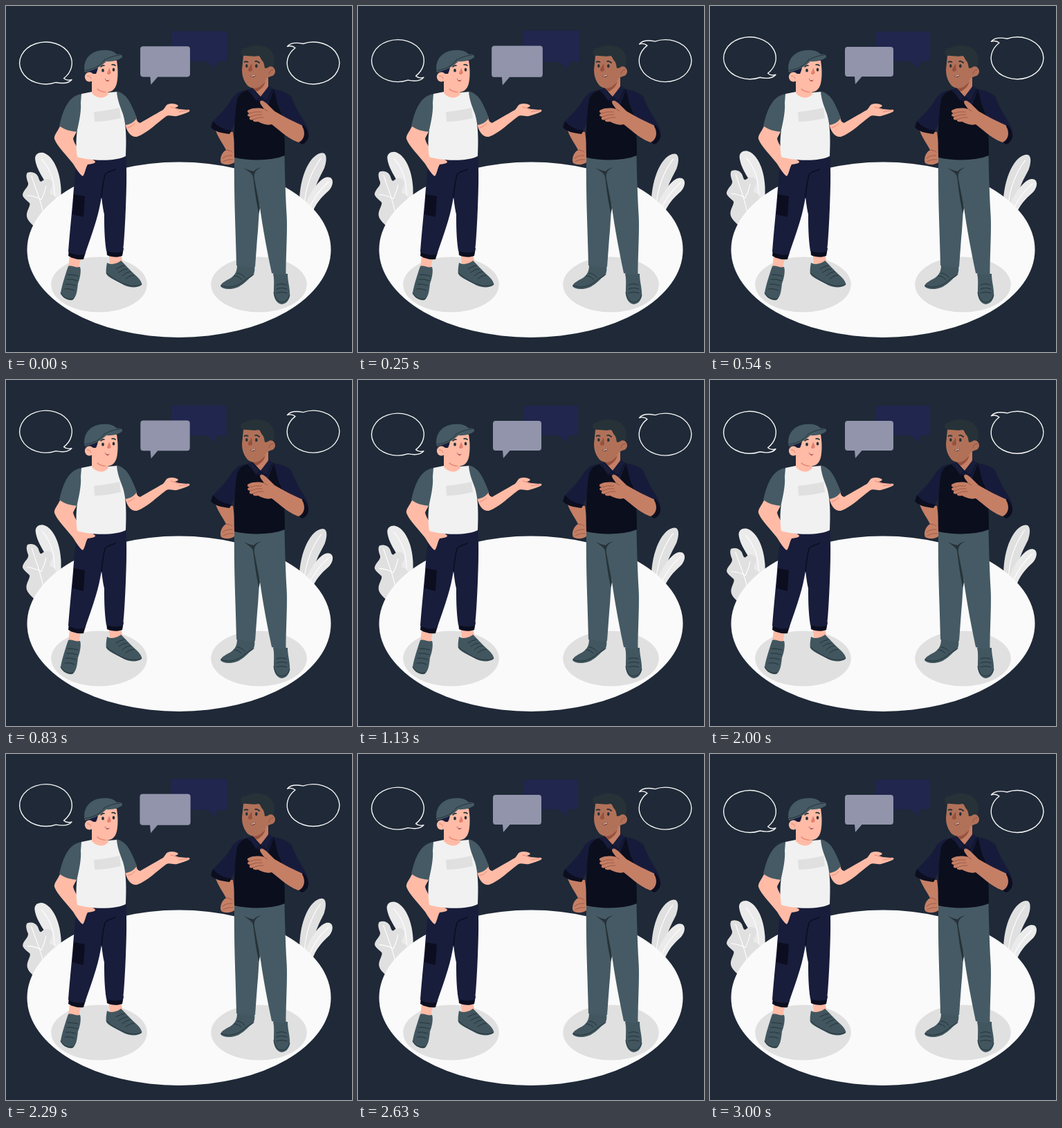
An HTML page with a canvas that plays this animation: 500 by 500 pixels, repeating every 3040 ms.

```html
<!DOCTYPE html>
<html lang="en">
<head>
<meta charset="utf-8">
<title>Two people talking</title>
<style>
  html, body { margin: 0; width: 100%; height: 100%; overflow: hidden; background: #1f2937; }
  canvas { display: block; width: 100vw; height: 100vh; }
</style>
</head>
<body>
<canvas id="stage"></canvas>
<script>
const canvas = document.getElementById('stage');
const ctx = canvas.getContext('2d');
const LOOP = 3040;
const C = {
  bg: '#1f2937', floor: '#fafafa', shade: '#e0e0e0', leaf: '#ebebeb',
  slate: '#455a64', ink: '#263238', shoe: '#41565f', navy: '#181d3b', deep: '#0c0e20',
  skin: '#ffbba6', blush: '#e5806e', brown: '#c57f65', face: '#b17159', umber: '#96523f',
  shirt: '#f1f1f1', vest: '#0b0e1d', sleeve: '#171b3b',
  bubble: '#9194aa', bubbleBack: '#20264d'
};

function fill(d, color) {
  ctx.fillStyle = color;
  ctx.fill(new Path2D(d));
}

function line(d, color, width = 1) {
  ctx.strokeStyle = color;
  ctx.lineWidth = width;
  ctx.lineCap = ctx.lineJoin = 'round';
  ctx.stroke(new Path2D(d));
}

function oval(x, y, rx, ry, color) {
  ctx.beginPath();
  ctx.ellipse(x, y, rx, ry, 0, 0, Math.PI * 2);
  ctx.fillStyle = color;
  ctx.fill();
}

// Draws with a rotation and scale about a pivot.
function about(x, y, angle, scale, draw) {
  ctx.save();
  ctx.translate(x, y);
  ctx.rotate(angle);
  ctx.scale(scale, scale);
  ctx.translate(-x, -y);
  draw();
  ctx.restore();
}

// Linear interpolation through [position, value] keys.
function keys(p, list) {
  for (let i = 1; i < list.length; i++) {
    const [a, u] = list[i - 1], [b, v] = list[i];
    if (p <= b) return u + (v - u) * (p - a) / (b - a);
  }
  return list[list.length - 1][1];
}

const floating = [[0, 0], [.5, -10], [1, 0]];
const beat = [[0, 1], [.1, 1.1], [.3, 1], [.4, 1], [.5, 1.1], [.6, 1], [1, 1]];
const wind = [[0, 0], [.25, 1], [.75, -1], [1, 0]];

function plants() {
  fill('M42 221C42 215 46 212 52 212C66 214 78 236 79.5 264L80 295L58 300C63 275 60 262 54 250C48 240 43 231 42 221Z', C.leaf);
  line('M52 222C64 236 72 254 70 285', '#fff', 1.1);
  fill('M31 241C37 239 43 241 46 246C48 250 48 254 51 254C57 248 66 249 67 256C68 263 61 268 64 272C68 273 71 274 72 279L56 312L41 319C37 315 29 309 30 301C31 294 36 288 34 285C30 281 24 277 24 273C25 266 33 262 32 256C30 251 28 244 31 241Z', C.shade);
  line('M37 246C42 263 49 276 54 300M31 274Q43 275 51 280M51 280Q56 270 58 260', '#fff', 1.1);
  fill('M424 285C424 245 440 213 457 212C464 212 464 223 460 234C451 252 444 262 442 295Z', C.shade);
  line('M455 220C441 239 433 260 431 288', '#fff', 1.1);
  fill('M430 294C437 271 454 247 465 247C474 247 474 258 467 266C456 276 447 285 441 303Z', C.leaf);
  line('M466 254C454 264 445 276 437 295', '#fff', 1.1);
}

// Ellipse left open at the lower right for a curved tail.
function outlineBubble() {
  ctx.beginPath();
  ctx.ellipse(57.5, 83, 37.8, 30.4, 0, 1.17, .81 + Math.PI * 2);
  ctx.bezierCurveTo(87, 108, 91, 108.3, 95, 107);
  ctx.bezierCurveTo(91, 112, 82, 113, 72.2, 111);
  ctx.strokeStyle = '#f5f5f5';
  ctx.lineWidth = 1.4;
  ctx.stroke();
}

function outlineBubbles(p) {
  ctx.save();
  ctx.translate(0, keys(p, floating));
  outlineBubble();
  about(250.75, 83, Math.PI, 1, outlineBubble);
  ctx.restore();
}

function speech(p) {
  const s = keys(p, beat);
  about(279, 63.5, 0, s, () =>
    fill('M243 37H315Q318 37 318 40V77Q318 80 315 80H304L302 90L290 80H243Q240 80 240 77V40Q240 37 243 37Z', C.bubbleBack));
  about(230, 86, 0, s, () =>
    fill('M199 59H261Q265 59 265 63V98Q265 102 261 102H219.5L210 113L209 102H199Q195 102 195 98V63Q195 59 199 59Z', C.bubble));
}

function leftMan() {
  // legs and feet
  fill('M92 361L108 364L105 381L90 378Z', C.skin);
  fill('M148 358L166 358L169 373L151 377Z', C.skin);
  fill('M90 376C95 374 101 379 107 377C109 382 107 394 104 401C103 410 102 421 96 425C90 426 81 422 79 415C80 407 85 390 90 376Z', C.shoe);
  fill('M146 371C152 375 161 372 166 368C172 373 179 382 186 388C192 393 197 399 196 403C190 408 178 407 170 403C161 398 147 392 145 387C144 382 145 377 146 371Z', C.shoe);
  line('M79 415C83 422 91 425 97 423M145 386C155 394 166 401 178 404C185 405 192 405 196 402M89 388Q97 388 104 390M88 395Q96 394 103 397M86 402Q94 401 101 404M85 409Q93 408 99 411M159 380Q165 376 171 375M163 385Q169 380 175 380M168 390Q174 384 180 384M173 394Q179 389 185 389', C.ink, 1);
  fill('M91 352L115 356L112 366C104 367 96 365 90 361Z', C.deep);
  fill('M145 350L170 350L168 361C161 364 152 363 146 360Z', C.deep);
  fill('M104 214L173 213C175 240 174 266 173 292C172 315 171 336 169 355C162 357 153 357 145 354C142 335 142 315 142 301C140 293 139 283 138 276C136 287 134 298 130 311C125 328 119 344 114 359C105 361 96 359 90 355C92 329 95 300 97 276C99 251 101 231 104 214Z', C.navy);
  fill('M98 272L114 275L112 305L96 301Z', C.deep);
  line('M158 236C151 239 145 240 143 244C140 255 139 265 138 277', C.deep, 1.6);

  // arms
  fill('M79 172C74 182 69 187 70 192C74 203 87 215 97 228C102 236 107 244 111 246C114 243 115 234 118 229C123 228 129 228 129 225C127 221 119 221 112 218C106 209 99 200 97 192C98 188 101 185 103 179Z', C.skin);
  fill('M172 169C174 181 180 190 189 189C204 184 218 169 232 159C237 157 241 160 247 159C254 157 260 155 264 153C267 151 265 149 261 150L250 149L244 147C247 146 250 145 248 143C244 141 239 140 234 142C231 143 230 147 227 150C215 157 202 164 194 169C190 168 189 166 188 160Z', C.skin);
  line('M176 176Q181 175 186 170M238 146Q244 147 249 150M250 153L263 151', C.blush, .9);

  // torso
  fill('M111 127C99 128 93 134 87 144C82 153 79 164 77 173C84 179 94 181 103 182C109 166 113 147 111 127Z', C.slate);
  fill('M159 123C171 126 175 132 180 141C184 149 187 156 189 162C185 168 179 171 173 172C164 160 160 145 159 123Z', C.slate);
  fill('M124 124C132 131 141 132 148 125L160 124C161 136 165 145 169 156C174 172 174 194 173 217C161 224 125 225 103 218C101 206 101 192 103 179C106 166 109 151 108 140L109 127Z', C.shirt);
  fill('M127 153C139 152 152 150 164 147L166 162C153 165 141 167 128 167Z', C.shade);
  fill('M124 108L147 119L148 127C142 135 131 134 124 126Z', C.skin);
  line('M132 120Q138 125 145 124', C.blush, 1.2);

  // head
  fill('M126 88C139 78 152 77 160 79C162 91 162 103 160 112C158 120 153 125 145 124C136 123 129 116 126 107Z', C.skin);
  fill('M116 92L134 83C133 91 131 98 127 103L124 96L117 96Z', C.navy);
  oval(120.5, 102.5, 6.6, 7, C.skin);
  fill('M123 98L130 98V110L124 109Z', C.skin);
  line('M117.5 101Q121 100 123 105', C.blush, 1);
  fill('M114 96C110 79 121 65 139 64C150 63 157 66 160 70C165 69 169 71 168 74C164 78 153 81 145 80C137 88 127 93 114 96Z', C.slate);
  line('M115 93C129 91 137 85 142 78C148 75 157 71 165 71', C.ink, 1);
  oval(140, 93, 1.9, 2.6, C.ink);
  oval(155.5, 92, 1.8, 2.5, C.ink);
  line('M137 88Q139 85.5 142 86M153 85Q155 84 158 86', C.ink, 1.6);
  fill('M149 89C150 93 153 96 151 98C149 100 146 99 146 97C147 95 148 92 149 89Z', C.blush);
  fill('M142.5 104.5Q146 107 150 106Q149 109.5 146 109Q143.5 108 142.5 104.5Z', '#b7443f');
  line('M144 106Q147 107.3 149 106.8', '#fff', .9);
}

function rightMan() {
  // legs and feet
  fill('M334 374L359 376C360 382 359 388 355 391C350 394 346 400 339 404C331 410 315 411 310 405C311 400 318 397 325 393C332 388 334 382 334 374Z', C.shoe);
  fill('M386 387L407 387C407 399 411 409 410 419C409 426 404 431 398 431C391 430 387 422 387 414C387 403 388 395 386 387Z', C.shoe);
  line('M311 404C321 409 334 405 342 399C348 393 352 392 358 388M334 386Q340 386 345 392M330 390Q336 390 340 395M387 414C389 425 394 428 399 428C404 428 408 424 410 418M391 403Q398 400 405 403M391 409Q398 406 406 409M391 415Q398 412 406 415', C.ink, 1);
  fill('M330 216L365 218L367 285C365 300 365 317 363 336L360 377C351 378 342 377 333 375C332 325 329 271 330 216Z', C.slate);
  fill('M341 216L402.5 215C403 244 404 274 405.5 301C407 323 404.5 360 404.5 387C398 389 390 388 384 386C378 357 371 322 366 284L356 237Z', C.slate);
  fill('M370 233C360 237 358 241 359 250L367 292L365.5 300C361 280 359 262 357 247C356 241 349 239 344 234C351 238 355 238 358 239C360 236 365 234 370 233Z', C.ink);

  // left arm on the hip
  fill('M303 180C307 191 314 200 318 208C312 211 308 221 311 227C318 231 326 229 330 226V198L328 182Z', C.brown);
  line('M318 208Q324 208 327 211M313 220Q319 215 327 216M314 225Q320 221 328 222', C.umber, .8);
  fill('M345 122C334 124 329 129 324 138C316 151 304 160 298 169C301 178 315 184 323 183C327 179 331 170 332 163Z', C.sleeve);
  fill('M299 166C304 173 315 179 326 180L323 185C312 184 300 181 296 175Z', C.deep);

  // torso
  fill('M384 120C397 121 409 126 413 132C417 145 424 155 432 169C437 178 439 187 436 192L430 199L390 166Z', C.sleeve);
  fill('M347 122C362 117 374 117 387 120C390 129 391 139 395 149C402 160 403 188 403 216C383 224 352 224 330 219C329 190 330 165 333 141C334 132 337 126 347 122Z', C.vest);
  fill('M348 121L358 119L369 130L380 116L387 121L377 147L368 140Z', C.sleeve);
  fill('M358 109L379 103L379 118L368 131C363 129 359 126 357 121Z', C.brown);
  fill('M358 117Q369 116 375 109Q372 120 361 124L358 122Z', C.umber);
  fill('M357 119L368 131L362 138L354 126Z', C.navy);
  fill('M380 115L386 121L378 139L368 131Z', C.navy);
  line('M357 120L367 132L362 137M368 132L377 138L385 121M368 133L369 147', C.vest, .9);

  // right arm and hand
  fill('M388 152C401 160 416 167 431 174C437 182 435 196 427 198C411 195 397 181 384 171C377 173 370 170 364 167C360 168 356 167 357 164C353 166 350 163 353 160C348 160 348 156 352 155C348 154 348 151 351 150C358 147 366 147 373 149C370 144 365 140 368 137C372 135 379 143 384 148Z', C.brown);
  line('M352 155Q361 152 369 153M353 160Q362 156 370 157M357 164Q365 160 372 161M373 149L378 152', C.umber, .8);
  fill('M429 171C434 176 437 182 437 189C436 194 433 198 428 200L423 197C432 193 433 182 428 174Z', C.deep);

  // head
  fill('M343 72C352 66 366 66 374 72L379 91C379 103 374 112 366 117C361 120 353 119 349 115C343 108 341 100 341 92Z', C.face);
  fill('M341 72C337 66 340 61 345 61C352 57 364 56 370 58C379 59 386 66 388 76C389 84 386 91 381 94L376 96C373 90 374 84 371 80C368 77 368 73 365 72C357 74 349 71 341 72Z', C.ink);
  oval(382.5, 94.5, 6.5, 7.2, C.face);
  fill('M374 90L382 89V102L374 105Z', C.face);
  line('M380 98Q381 92 386 92', C.umber, 1);
  oval(347.8, 86.5, 1.7, 2.5, C.ink);
  oval(361.8, 86.7, 1.8, 2.6, C.ink);
  line('M344.5 81Q347 79.5 349.5 81M360 80Q363 79 366 82', C.ink, 1.8);
  fill('M355 83C353 87 349 91 350 93C351 95 354 95 356 93Z', C.umber);
  fill('M353 100.5Q357 101.5 361 98.5Q360 103 356.5 103Q354 103 353 100.5Z', '#6f332d');
  line('M355 101.4Q358 101.4 359.8 100', '#fff', .9);
}

function render(now) {
  const clock = Math.min(now % LOOP + 40, 3000);
  const short = clock % 1500 / 1500;
  const long = clock / 3000;

  const ratio = window.devicePixelRatio || 1;
  const w = Math.round(innerWidth * ratio), h = Math.round(innerHeight * ratio);
  if (canvas.width !== w || canvas.height !== h) {
    canvas.width = w;
    canvas.height = h;
  }
  ctx.setTransform(w / 500, 0, 0, h / 500, 0, 0);
  ctx.fillStyle = C.bg;
  ctx.fillRect(0, 0, 500, 500);

  about(248.5, 265, keys(long, wind) * Math.PI / 180, 1, plants);
  oval(250, 352.3, 219.5, 126.7, C.floor);
  oval(134.5, 402.5, 69.3, 40, C.shade);
  oval(365.5, 402.5, 69.3, 40, C.shade);
  outlineBubbles(short);
  speech(short);
  leftMan();
  rightMan();
}

const start = performance.now();
function tick() {
  render(performance.now() - start);
  requestAnimationFrame(tick);
}
tick();
</script>
</body>
</html>
```
